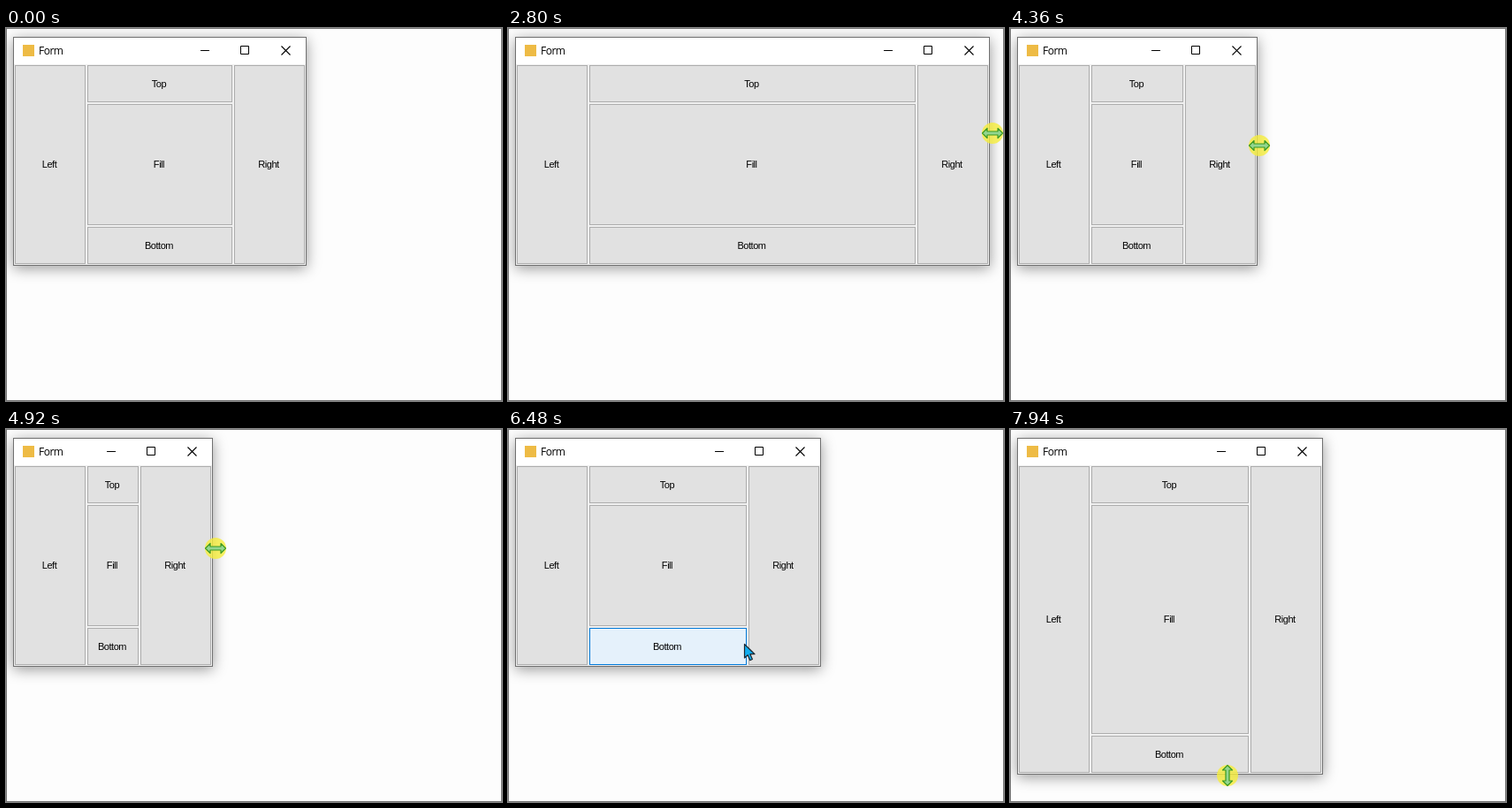
An HTML page for the animation above (8 s loop, 561 by 422 pixels).

```html
<!DOCTYPE html>
<html lang="en">
<head>
<meta charset="utf-8">
<title>Docked buttons</title>
<style>
  html, body { margin: 0; width: 100%; height: 100%; overflow: hidden; background: #fdfdfd; }
  #stage { position: relative; width: 561px; height: 422px; overflow: hidden; background: #fdfdfd; }
  #win {
    position: absolute; left: 8px; top: 10px; box-sizing: border-box;
    border: 1px solid #707070; background: #f0f0f0;
    box-shadow: 0 3px 15px rgba(0, 0, 0, .4);
  }
  #bar { position: absolute; inset: 0 0 auto; height: 30px; background: #fff; }
  #bar i { position: absolute; left: 10px; top: 8px; width: 13px; height: 13px; background: #eebb45; }
  #bar span {
    position: absolute; left: 28px; top: 0;
    font: 12px/30px "Open Sans", "Noto Sans", sans-serif; letter-spacing: -.5px; color: #000;
  }
  #bar svg { position: absolute; right: 0; top: 0; }
  .btn {
    position: absolute; box-sizing: border-box; isolation: isolate;
    display: flex; align-items: center; justify-content: center; padding-right: 2px;
    border: 1px solid #adadad; background: #e1e1e1; color: #000;
    font: 11px/13px "Liberation Sans", Arial, sans-serif; letter-spacing: -.45px;
  }
  .btn::after {
    content: ""; position: absolute; inset: -1px; z-index: -1;
    border: 1px solid #0078d7; background: #e5f1fb; opacity: var(--hot, 0);
  }
  #left, #right { top: 31px; bottom: 1px; width: 80px; }
  #left { left: 1px; }
  #right { right: 1px; }
  #top, #fill, #bottom { left: 83px; right: 83px; }
  #top { top: 31px; height: 42px; }
  #fill { top: 75px; bottom: 45px; }
  #bottom { bottom: 1px; height: 42px; }
  #over { position: absolute; left: 0; top: 0; outline: 1px solid #757575; outline-offset: -1px; }
</style>
</head>
<body>
<div id="stage">
  <div id="win">
    <div id="bar">
      <i></i><span>Form</span>
      <svg width="138" height="30" fill="none" stroke="#000">
        <path d="M19 14.5h10M64.5 9.5h9v9h-9z"/>
        <path d="M110.5 9.5l10 10m0-10l-10 10" stroke-width="1.1"/>
      </svg>
    </div>
    <div class="btn" id="left">Left</div>
    <div class="btn" id="top">Top</div>
    <div class="btn" id="fill">Fill</div>
    <div class="btn" id="bottom">Bottom</div>
    <div class="btn" id="right">Right</div>
  </div>
  <svg id="over" width="561" height="422">
    <g id="cursor">
      <circle id="press" r="12" fill="#f6ee3c" fill-opacity=".8"/>
      <path id="sizer" d="M-11.5 0L-6-5.5V-2H6V-5.5L11.5 0L6 5.5V2H-6V5.5Z"
            fill="#93d690" stroke="#3c9a22" stroke-width="1.2" stroke-linejoin="round"/>
      <path id="arrow" d="M.5 .5V16L4.200 12.700L6.700 18.700L9.400 17.500L6.900 11.700H12Z"
            fill="#12aef0" stroke="#1d2730" stroke-width="1.2" stroke-linejoin="round"/>
    </g>
  </svg>
</div>
<script>
const LOOP = 8000;
const el = id => document.getElementById(id);
const clamp = v => Math.max(0, Math.min(1, v));
const power = p => u => 1 - (1 - u) ** p;
const quad = power(2);
const smooth = u => u * u * (3 - 2 * u);

// Pointer legs: start, end, target x, target y, easing, lag of the resized window
const START = [422, 13];
const LEGS = [
  [300, 905, 342, 115, quad, 0],
  [1405, 2605, 547.6, 119, quad, 22],
  [3350, 4994, 236, 135, quad, 0],
  [5205, 5945, 356.6, 133, smooth, 6],
  [6220, 6720, 251, 263, power(2.57), 0],
  [6865, 6965, 251, 270, quad, 0],
  [7325, 7930, 246, 392, quad, 0]
];
const DRAG_X = [1240, 6240], DRAG_Y = [7230, LOOP];
const within = (t, [a, b]) => t >= a && t < b;

function pointer(t) {
  let [x, y] = START;
  let lag = 0;
  for (const [from, to, tx, ty, ease, delay] of LEGS) {
    if (t < from) break;
    const k = ease(clamp((t - from) / (to - from)));
    x += (tx - x) * k;
    y += (ty - y) * k;
    lag = delay;
  }
  return { x, y, lag };
}

function windowEdges(t, lag) {
  const px = pointer(Math.max(DRAG_X[0], Math.min(DRAG_X[1] - 40, t - lag))).x;
  const py = pointer(Math.max(DRAG_Y[0], t)).y;
  return { right: Math.floor(px - 2), bottom: Math.round(py - 1) };
}

function show(node, on) {
  node.style.display = on ? "" : "none";
}

function draw(t) {
  const { x, y, lag } = pointer(t);
  const { right, bottom } = windowEdges(t, lag);
  el("win").style.width = right - 8 + "px";
  el("win").style.height = bottom - 10 + "px";

  const dragX = within(t, DRAG_X), dragY = within(t, DRAG_Y);
  const vert = dragY || (!dragX && y >= bottom - 1);
  const horz = !vert && (dragX || (x >= right - 2 && x < right + 9));
  const sizing = vert || horz;

  show(el("cursor"), t >= 300);
  show(el("press"), dragX || dragY);
  show(el("sizer"), sizing);
  show(el("arrow"), !sizing);
  el("cursor").setAttribute("transform", `translate(${Math.round(x)} ${Math.round(y)})`);
  el("sizer").setAttribute("transform", vert ? "rotate(90)" : "");

  const inside = t > DRAG_X[1] && t < 7000;
  const overRight = inside && !sizing && x >= right - 82;
  const overBottom = inside && x < right - 84;
  el("right").style.setProperty("--hot", overRight ? 1 : 0);
  el("bottom").style.setProperty("--hot", overBottom ? clamp((7000 - t) / 90) : 0);
}

const begin = performance.now();
function tick() {
  draw((performance.now() - begin) % LOOP);
  requestAnimationFrame(tick);
}
tick();
</script>
</body>
</html>
```
